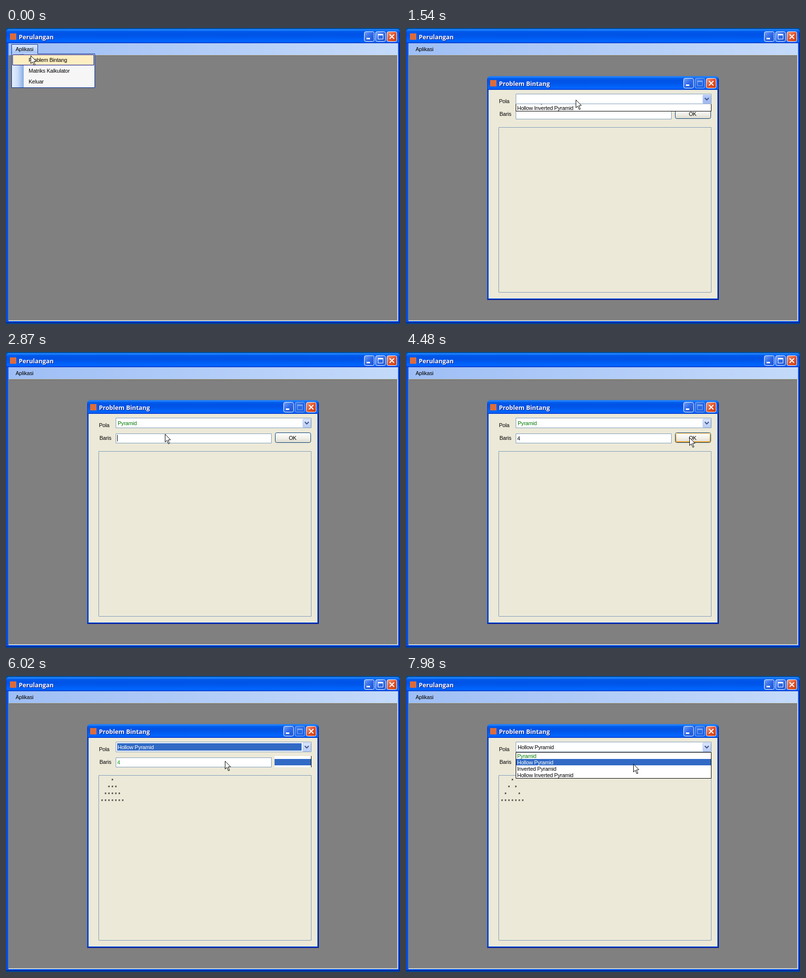
Write an HTML page with a canvas that moves like this. It is 801 px wide and 603 px high and loops after 8 s.

```html
<!DOCTYPE html>
<html>
<head>
<meta charset="utf-8">
<style>
html, body { margin: 0; width: 100%; height: 100%; overflow: hidden; background: #808080; }
canvas { display: block; }
</style>
</head>
<body>
<canvas id="stage" width="801" height="603"></canvas>
<script>
const c = document.getElementById('stage').getContext('2d');
const LOOP = 8000, STEP = 70;
const FACE = '#ece9d8', EDGE = '#7f9db9', BLUE = '#316ac5', GREEN = '#007a00';
const ITEMS = ['Pyramid', 'Hollow Pyramid', 'Inverted Pyramid', 'Hollow Inverted Pyramid'];
const SANS = '11px "Liberation Sans", Arial, sans-serif';
const TITLE = 'bold 12.4px "Open Sans", "Noto Sans", sans-serif';
const TITLE_STOPS = [[0, '#0a6cf0'], [.06, '#2f8cff'], [.14, '#0060ee'], [.3, '#0053e6'],
  [.5, '#0055e8'], [.85, '#0066ff'], [.92, '#0060f8'], [.97, '#003dd7'], [1, '#0035b8']];

// mouse path: time, x, y
const PATH = [[0, 50, 56], [140, 51, 57], [210, 51, 58], [700, 51, 58], [1120, 325, 167],
  [1400, 345, 146], [1610, 345, 146], [2030, 329, 162], [2520, 329, 162], [2730, 323, 167],
  [3850, 323, 167], [4130, 440, 161], [4480, 576, 174], [4620, 576, 174], [5040, 447, 147],
  [5320, 447, 147], [5740, 446, 172], [5880, 445, 173], [6020, 445, 173], [6650, 572, 177],
  [7000, 572, 177], [7280, 469, 147], [7560, 469, 147], [7980, 462, 179]];

// drop-down list: opens, closes, selected item
const LISTS = [[1540, 2310, -1], [5180, 6020, 0], [7560, LOOP, 1]];

function mouseAt(t) {
  const i = PATH.findIndex(k => k[0] > t);
  if (i < 0) return PATH[PATH.length - 1].slice(1);
  const [a, b] = [PATH[i - 1], PATH[i]], u = (t - a[0]) / (b[0] - a[0]);
  return [1, 2].map(k => Math.round(a[k] + (b[k] - a[k]) * u));
}

function rect(x, y, w, h, fill) {
  c.fillStyle = fill;
  c.fillRect(x, y, w, h);
}

function box(x, y, w, h, fill, edge, r = 0) {
  c.beginPath();
  c.roundRect(x + .5, y + .5, w - 1, h - 1, r);
  c.fillStyle = fill;
  c.fill();
  c.strokeStyle = edge;
  c.lineWidth = 1;
  c.stroke();
}

function grad(x0, y0, x1, y1, ...stops) {
  const g = c.createLinearGradient(x0, y0, x1, y1);
  stops.forEach((s, i) => Array.isArray(s) ? g.addColorStop(...s) : g.addColorStop(i / (stops.length - 1), s));
  return g;
}

function line(color, width, ...pts) {
  c.beginPath();
  for (let i = 0; i < pts.length; i += 2) c.lineTo(pts[i], pts[i + 1]);
  c.strokeStyle = color;
  c.lineWidth = width;
  c.stroke();
}

function text(s, x, y, color = '#000') {
  c.font = SANS;
  c.letterSpacing = '-0.22px';
  c.fillStyle = color;
  c.fillText(s, x, y);
}

function titleText(s, x, y) {
  c.font = TITLE;
  c.letterSpacing = '0px';
  for (const [d, color] of [[1, '#0a1883'], [0, '#fff']]) {
    c.fillStyle = color;
    c.fillText(s, x + d, y + d);
  }
}

function captionButton(x, y, kind, off) {
  const red = kind === 'close';
  const colors = red ? ['#f0a088', '#e2542c', '#c83c10'] : off ? ['#4c86ee', '#2768e4', '#1f62e0'] : ['#7aa4f8', '#2f6ae8', '#1c50d0'];
  const ink = off ? '#7da5ee' : '#fff';
  box(x, y, 21, 21, grad(x, y, x + 21, y + 21, ...colors), off ? '#8fb2f2' : '#fff', 3);
  if (red) {
    line(ink, 2.2, x + 6, y + 6, x + 15, y + 15);
    line(ink, 2.2, x + 15, y + 6, x + 6, y + 15);
  } else if (kind === 'min') {
    rect(x + 5, y + 13, 7, 3, ink);
  } else {
    c.strokeStyle = ink;
    c.lineWidth = 1;
    c.strokeRect(x + 5.5, y + 5.5, 10, 10);
    rect(x + 5, y + 5, 11, 3, ink);
  }
}

function frame(x, y, w, h, bar, edge) {
  c.save();
  c.beginPath();
  c.roundRect(x, y, w, h, [7, 7, 0, 0]);
  c.clip();
  rect(x, y, w, h, '#0855dd');
  rect(x, y, w, bar, grad(0, y, 0, y + bar, ...TITLE_STOPS));
  rect(x, y + 6, 1, h, '#0831d9');
  rect(x + w - 1, y + 6, 1, h, edge);
  rect(x + w - 2, y + bar, 1, h, '#0030c0');
  rect(x, y + h - 1, w, 1, edge);
  rect(x, y + h - 2, w, 1, '#0030c0');
  c.restore();
}

function mainWindow() {
  rect(0, 0, 801, 603, '#004e98');
  frame(0, 2, 801, 599, 29, '#00138c');
  rect(8, 11, 13, 13, '#dc6c3c');
  titleText('Perulangan', 26, 23);
  captionButton(728, 7, 'min');
  captionButton(751, 7, 'max');
  captionButton(774, 7, 'close');
  rect(5, 31, 792, 24, grad(5, 0, 797, 0, '#9ebef5', '#c4dafa'));
  rect(5, 55, 792, 542, '#fff');
  rect(5, 55, 791, 541, '#aca899');
  rect(6, 56, 789, 539, '#808080');
  rect(6, 56, 789, 1, '#716f64');
  rect(6, 56, 1, 539, '#716f64');
}

function menu() {
  box(11, 33, 54, 21, grad(0, 33, 0, 53, '#dfebff', '#a4c2f4'), '#002d96');
  box(11, 52, 170, 70, '#f6f6f6', '#002d96');
  rect(12, 52, 52, 1, '#a4c2f4');
  rect(12, 53, 24, 68, grad(12, 0, 36, 0, '#e3efff', '#cbddfb', '#87ade4'));
  box(13, 54, 166, 22, '#ffeec2', '#000080');
  ['Problem Bintang', 'Matriks Kalkulator', 'Keluar'].forEach((s, i) => text(s, 46, 69 + 22 * i));
}

function okButton(hot, focus) {
  box(547, 164, 73, 21, grad(0, 164, 0, 185, '#fff', '#f3f2ec', '#dcd8cc'), '#003c74', 3);
  const ring = hot ? ['#fcd88c', '#e89818'] : focus && ['#cee7ff', '#6982ee'];
  if (ring) {
    c.beginPath();
    c.roundRect(549, 166, 69, 17, 1);
    c.strokeStyle = grad(0, 165, 0, 184, ...ring);
    c.lineWidth = 2;
    c.stroke();
  }
  text('OK', 575, 179);
}

function combo(t, hot) {
  const open = LISTS.some(l => t >= l[0] && t < l[1]);
  const lit = !open && (t < 2870 || (t >= 6020 && t < 6860));
  const value = t < 2310 ? '' : t < 6020 ? ITEMS[0] : ITEMS[1];
  box(223, 134, 398, 21, '#fff', EDGE);
  if (lit) rect(226, 137, 375, 15, BLUE);
  text(value, 227, 149, lit ? '#fff' : t < 6020 ? GREEN : '#000');
  const shades = hot ? ['#b8ccfa', '#9cb6f0'] : ['#dce7ff', '#b8cbf6'];
  box(603, 136, 17, 18, grad(0, 136, 0, 154, ...shades), '#b4c8f0', 1.5);
  line('#3c5488', 2, 607.5, 142.5, 611.5, 146.5, 615.5, 142.5);
}

function stars(hollow) {
  c.font = '11px "Liberation Mono", monospace';
  c.letterSpacing = '0px';
  c.fillStyle = '#000';
  for (let row = 0; row < 4; row++)
    for (let col = 3 - row; col <= 3 + row; col++)
      if (!hollow || row === 3 || Math.abs(col - 3) === row)
        c.fillText('*', 192 + 7 * col, 217 + 14 * row);
}

function dropList(t, mx, my) {
  const list = LISTS.find(l => t >= l[0] && t < l[1]);
  if (!list) return;
  const [start, , selected] = list;
  const h = Math.min(54, 15 + Math.round((t - start) / STEP * 19.5));
  const over = Math.floor((my - 156) / 13);
  const active = over >= 0 && over < 4 ? over : selected;
  c.save();
  c.beginPath();
  c.rect(223, 155, 398, h);
  c.clip();
  c.translate(0, h - 54);
  box(223, 155, 398, 54, '#fff', '#000');
  ITEMS.forEach((s, i) => {
    const on = i === active;
    if (on) rect(224, 156 + 13 * i, 396, 13, BLUE);
    text(s, 226, 167 + 13 * i, on ? '#fff' : i === 0 && start > 5000 ? GREEN : '#000');
  });
  c.restore();
}

function dialog(t, mx, my) {
  frame(165, 98, 471, 456, 28, '#00138c');
  rect(168, 126, 465, 425, FACE);
  rect(171, 106, 13, 13, '#dc6c3c');
  titleText('Problem Bintang', 189, 118);
  captionButton(564, 102, 'min');
  captionButton(587, 102, 'max', true);
  captionButton(610, 102, 'close');
  text('Pola', 189, 153);
  text('Baris', 190, 179);

  const inside = (x, y, w, h) => mx >= x && mx < x + w && my >= y && my < y + h;
  combo(t, inside(223, 134, 398, 21));

  box(223, 166, 317, 20, '#fff', EDGE);
  if (t >= 3920) text('4', 226, 180, t < 6020 ? '#000' : '#10a010');
  if ((t >= 2870 && t < 3360) || (t >= 3850 && t < 4410))
    rect(t < 3920 ? 226 : 233, 169, 1, 13, '#000');

  okButton(inside(547, 164, 73, 21), (t >= 4550 && t < 5180) || t >= 6860);
  // part of the closing list lingers for one step
  if (t >= 6020 && t < 6090) {
    rect(546, 163, 75, 23, '#fff');
    rect(546, 169, 74, 13, BLUE);
    rect(620, 163, 1, 23, '#000');
  }

  box(188, 202, 433, 337, FACE, EDGE);
  if (t >= 4620) stars(t >= 6930);
  dropList(t, mx, my);
}

function pointer(x, y) {
  c.beginPath();
  [[0, 0], [0, 16], [3.6, 12.6], [6.6, 19.6], [9, 18.6], [6, 11.8], [11, 11.4]]
    .forEach(([dx, dy]) => c.lineTo(x + .5 + dx, y + .5 + dy));
  c.closePath();
  c.fillStyle = '#fff';
  c.fill();
  c.strokeStyle = '#000';
  c.lineWidth = 1;
  c.stroke();
}

function draw(now) {
  const t = Math.floor(now % LOOP / STEP) * STEP;
  const [mx, my] = mouseAt(t);
  mainWindow();
  if (t < 490) menu();
  text('Aplikasi', 19.5, 47);
  if (t >= 560) dialog(t, mx, my);
  pointer(mx, my);
  requestAnimationFrame(draw);
}
requestAnimationFrame(draw);
</script>
</body>
</html>
```
